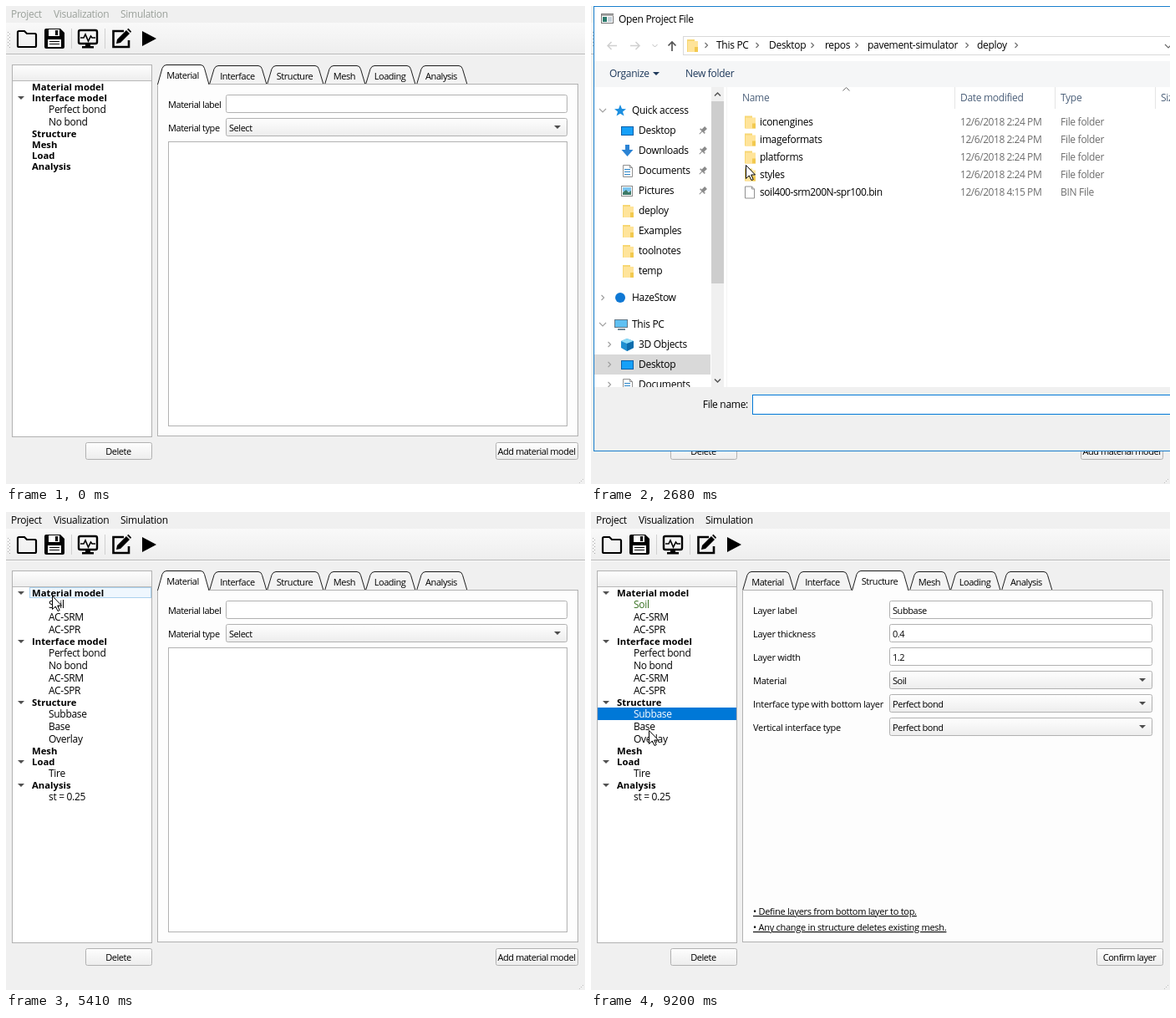
Write an HTML page that moves like this. It is 693 px wide and 572 px high and loops after 9.9 s.

```html
<!DOCTYPE html>
<html lang="en">
<head>
<meta charset="utf-8">
<title>Pavement simulator walkthrough</title>
<style>
html, body { margin: 0; width: 100%; height: 100%; overflow: hidden; background: #f0f0f0; }
svg { display: block; width: 693px; height: 572px; }
text { font: 12px "Open Sans", "Noto Sans", sans-serif; letter-spacing: -.3px; }
.s { font-size: 11px; letter-spacing: -.45px; }
.b { font-size: 11.3px; font-weight: 700; letter-spacing: 0; }
.n { letter-spacing: -.45px; }
.w { font-size: 11px; letter-spacing: -.27px; }
.u { text-decoration: underline; }
.c { text-anchor: middle; }
.e { text-anchor: end; }
</style>
</head>
<body>
<svg id="stage" viewBox="0 0 693 572" xmlns="http://www.w3.org/2000/svg"></svg>
<script>
const LOOP = 9900, EDGE = '#b1b1b1';
let css = '', count = 0;

// ---- drawing helpers
const fill = (x, y, w, h, c) => `<rect x="${x}" y="${y}" width="${w}" height="${h}" fill="${c}"/>`;
const box = (x, y, x2, y2, c = '#fff', edge = EDGE, r = 0) =>
  `<rect x="${x + .5}" y="${y + .5}" width="${x2 - x}" height="${y2 - y}" rx="${r}" fill="${c}" stroke="${edge}"/>`;
const path = (d, c = '#000', edge = 'none', w = 1) =>
  `<path d="${d}" fill="${c}" stroke="${edge}" stroke-width="${w}"/>`;
const line = (d, edge = EDGE, w = 1) => path(d, 'none', edge, w);
const text = (x, y, s, cls = '', c = '#000') => `<text x="${x}" y="${y}" class="${cls}" fill="${c}">${s}</text>`;
const down = (x, y, c = '#4d4d4d', w = 4) => path(`M${x - w} ${y - 2}h${2 * w}l${-w} ${w}z`, c);
const rows = (n, f) => Array.from({ length: n }, (_, i) => f(i)).join('');

// ---- timing helpers: every key holds until the next
const animate = (body, keys) => {
  const id = 'k' + count++;
  css += `@keyframes ${id}{${keys.map(([t, v]) => `${+(t / LOOP * 100).toFixed(4)}%{${v}}`).join('')}}`;
  return `<g style="animation:${id} ${LOOP}ms step-end infinite">${body}</g>`;
};
const layer = (body, keys) => animate(body, Object.entries(keys).map(([t, o]) => [t, `opacity:${o}`]));
const during = (a, b, body) => layer(body, { ...(a ? { 0: 0 } : {}), [a]: 1, ...(b < LOOP ? { [b]: 0 } : {}) });

// ---- form widgets
const label = (x, y, s) => text(x, y + 16, s, 's');
const edit = (x, y, x2, s = '', h = 21) => box(x, y, x2, y + h, '#fff', EDGE, 2) + text(x + 4, y + 16, s, 's');
const combo = (x, y, x2, s) => box(x, y, x2, y + 21, 'url(#soft)', EDGE, 2) +
  text(x + 4, y + 16, s, 's') + down(x2 - 11, y + 11);
const button = (x, x2, s) => box(x, 522, x2, 542, 'url(#soft)', EDGE, 2) + text((x + x2) / 2, 537, s, 's c');

// ---- main window
const toolbar = () =>
  fill(0, 20, 693, 37, 'url(#bar)') + line('M0 57.5H693', '#b8b8b8') + line('M0 58.5H693', '#fafafa') +
  rows(5, i => fill(2, 31 + i * 4, 1, 1, '#a8a8a8') + fill(4, 33 + i * 4, 1, 1, '#a8a8a8')) +
  line('M78.5 27V51M118.5 27V51', '#d0d0d0');

const icons = () =>
  line('M14 31.5Q14 30 15.5 30H22L25 33H34.500Q36 33 36 34.500V47.500Q36 49 34.500 49H15.500Q14 49 14 47.500Z', '#000', 2.2) +
  path('M48 27H65L70 32V49Q70 51 68 51H48Q46 51 46 49V29Q46 27 48 27Z') +
  fill(51, 28, 13, 8, '#fff') + fill(59, 29, 3, 6, '#000') + fill(50, 40, 16, 9, '#fff') +
  line('M52 42.500H64M52 45.500H64', '#000') +
  `<rect x="87" y="29" width="22" height="16" rx="2" fill="none" stroke="#000" stroke-width="2.400"/>` +
  line('M89 38H93L95 34L98.500 42L101.500 36L103 38H107', '#000', 1.6) + fill(95, 45, 6, 4, '#000') + fill(91, 48, 14, 2.5, '#000') +
  line('M141 30H128.500V49H147V41', '#000', 2.6) + path('M132 45L133 40L144 29L148 33L137 44Z') +
  path('M145 28L146.500 26.800L150 30.500L149 32Z') + path('M163 30L180 39L163 48Z');

const menu = c => [[6, 'Project'], [57, 'Visualization'], [137, 'Simulation']].map(([x, s]) => text(x, 14, s, '', c)).join('');

// '*' marks a heading, '+' an open heading
const tree = list => {
  let top = 91;
  return list.split('|').map(item => {
    const head = /^[*+]/.test(item), y = top + 6;
    top += head ? 13 : 15;
    return (item[0] === '+' ? down(18, y, '#505050') : '') +
      (head ? text(31, y + 4, item.slice(1), 'b') : text(51, y + 5, item));
  }).join('');
};
const picked = (top, s) => fill(8, top - 1, 166, 15, '#0078d7') + text(51, top + 11, s, '', '#fff');

const TABS = [[181, 243, 'Material'], [243, 312, 'Interface'], [312, 380, 'Structure'],
  [381, 430, 'Mesh'], [430, 490, 'Loading'], [491, 552, 'Analysis']];
const tab = ([a, b, s], on) => {
  const y = on ? 70.5 : 71.5;
  return path(`M${a + .5} 94L${a + 6} ${y + 4}Q${a + 7.5} ${y} ${a + 11} ${y}H${b - 10}Q${b - 6.5} ${y} ${b - 5.5} ${y + 4}L${b} 94`,
    on ? '#fdfdfd' : '#f3f3f3', '#1c1c1c') + text((a + b) / 2 - .5, on ? 87 : 88, s, 's c');
};
const panel = (active, body) => {
  const [a, b] = TABS[active];
  return TABS.map((t, i) => i === active ? '' : tab(t)).join('') +
    box(181, 93, 684, 514, '#fdfdfd') + tab(TABS[active], true) + fill(a + 1.5, 93, b - a - 2.5, 2, '#fdfdfd') + body;
};

const material = (name, type, extra, btn) => panel(0,
  label(194, 106, 'Material label') + edit(263, 106, 671, name) +
  label(194, 134, 'Material type') + combo(263, 134, 671, type) + box(194, 162, 671, 502) + extra + btn);

const soil = label(206, 174, 'E') + edit(228, 174, 659, '1e+08') + label(206, 202, 'nu') + edit(228, 202, 659, '0.35');

const DATA = [['inf.', '1.76506e+07', '-'], [1, '8.1e+09', '1e-05'], [2, '5.34e+09', '0.001'], [3, '2.09e+09', '0.1'],
  [4, '4.41e+08', '10'], [5, '7.92e+07', '1000'], [6, '1.78e+07', '100000'], [7, '5.28e+06', '1e+07']];
const table = () =>
  box(206, 174, 659, 354) + fill(207, 175, 411, 19, '#efefef') + fill(207, 194, 21, 160, '#efefef') +
  text(325, 189, 'Relaxation modulus (E)', 'w c') + text(520, 189, 'Relaxation time (Tau)', 'w c') +
  DATA.map(([k, e, tau], i) => {
    const y = 194 + i * 20;
    return line(`M207 ${y - .5}H617`, '#c4c4c4') + text(209, y + 15, k, 's') + text(231, y + 14, e, 's') +
      text(426, y + 14, tau, 's', i ? '#000' : '#4f8f38');
  }).join('') +
  line('M227.500 175V354M422.500 175V354M617.500 175V354', '#c4c4c4') +
  fill(645, 175, 14, 179, '#e6e6e6') + box(644, 174, 659, 188, '#fafafa', '#c4c4c4') +
  box(644, 188, 659, 246, '#f6f6f6', '#c4c4c4') + box(644, 340, 659, 354, '#fafafa', '#c4c4c4') +
  path('M648 184h8l-4-4z', '#43204a') + down(652, 347, '#43204a');

const joint = () => panel(1,
  label(194, 106, 'Interface label') + edit(305, 106, 671, 'AC-SRM') +
  label(194, 134, 'interface type') + combo(305, 134, 671, 'Viscoelastic cohesive model') +
  box(194, 162, 671, 422, '#fdfdfd', '#bdbdbd') + table() +
  ['N', 'T'].map((k, i) => {
    const y = 361 + 28 * i;
    return label(205, y, 'Delta_' + k) + edit(249, y, 429, '0.001') + label(435, y, 'Sigma_' + k) + edit(482, y, 659, '0');
  }).join('') +
  label(194, 429, 'Damage evolution law') + combo(305, 429, 671, 'Power function') +
  box(194, 457, 671, 502, '#fdfdfd', '#bdbdbd') +
  label(206, 469, 'C') + edit(219, 469, 353, '1.29') + label(358, 469, 'N') + edit(371, 469, 505, '0.5') +
  label(511, 469, 'M') + edit(525, 469, 659, '0.5') + button(563, 684, 'Confirm interface model'));

const LAYER = [['Layer label', 'Subbase'], ['Layer thickness', '0.4'], ['Layer width', '1.2'], ['Material', 'Soil'],
  ['Interface type with bottom layer', 'Perfect bond'], ['Vertical interface type', 'Perfect bond']];
const structure = () => panel(2,
  LAYER.map(([k, v], i) => {
    const y = 106 + 28 * i;
    return text(194, y + 16, k, 'w') + (i < 3 ? edit : combo)(357, y, 671, v);
  }).join('') +
  text(194, 482, '• Define layers from bottom layer to top.', 'w u') +
  text(194, 501, '• Any change in structure deletes existing mesh.', 'w u') + button(605, 684, 'Confirm layer'));

// ---- file dialog
const folder = (x, y) => fill(x, y, 9, 15, '#f7d774') + fill(x + 1, y + 2, 12, 13, '#ffe49a') + fill(x + 9, y + 9, 4, 6, '#f2c94f');
const page = (x, y) => path(`M${x + .5} ${y + .5}h8l3 3v11h-11z`, '#fff', '#909090') + line(`M${x + 8.5} ${y + .5}v3h3`, '#909090');
const screen = (x, y) => box(x, y, x + 14, y + 10, '#16a0f8', '#0b5fa8');
const sheet = (x, y) => page(x, y) + line(`M${x + 2} ${y + 5.5}h7m-7 3h7m-7 3h7`, '#2d87c9');
const art = {
  star: (x, y) => path(`M${x + 7} ${y}l2 5 5 .3-4 3.300 1.500 5-4.500-2.800-4.500 2.800 1.500-5-4-3.300 5-.3z`, '#1c8fe0'),
  screen: (x, y) => screen(x, y + 2), sheet, folder,
  arrow: (x, y) => path(`M${x + 5} ${y}h5v6h4.500l-7 8-7-8h4.500z`, '#2b83d4'),
  photo: (x, y) => box(x, y + 1, x + 13, y + 13, '#fff', '#8a8a8a') + fill(x + 2, y + 3, 10, 5, '#7cc6f2') +
    path(`M${x + 2} ${y + 12}v-3l4-3 3 3 3-2v5z`, '#3d7a68'),
  dot: (x, y) => `<circle cx="${x + 7}" cy="${y + 7}" r="6" fill="#0f78d4"/>`,
  pc: (x, y) => box(x, y + 1, x + 15, y + 10, '#5fc0f2', '#5f7788') + fill(x + 4, y + 12, 9, 2, '#6f8898'),
  cube: (x, y) => path(`M${x} ${y + 3}l7-3 8 3v8l-8 4-7-4z`, '#1f8fd0') + path(`M${x} ${y + 3}l7-3 8 3-8 3z`, '#8ddcf7') +
    path(`M${x + 7} ${y + 6}l8-3v8l-8 4z`, '#0d6dad')
};
const pin = y => `<g transform="translate(134 ${y}) rotate(45)">` + fill(-2, -5, 4, 6, '#8a8a8a') +
  fill(-4, 0, 8, 1.5, '#8a8a8a') + fill(-.5, 1, 1, 5, '#8a8a8a') + '</g>';

const SIDE = [['star', 'Quick access', 125], ['screen', 'Desktop', 149, 1], ['arrow', 'Downloads', 173, 1],
  ['sheet', 'Documents', 197, 1], ['photo', 'Pictures', 221, 1], ['folder', 'deploy', 245], ['folder', 'Examples', 269],
  ['folder', 'toolnotes', 293], ['folder', 'temp', 317], ['dot', 'HazeStow', 349], ['pc', 'This PC', 381],
  ['cube', '3D Objects', 405], ['screen', 'Desktop', 429], ['sheet', 'Documents', 453]];
const TOP = ['Quick access', 'HazeStow', 'This PC'];
const sidebar = () => fill(4, 417, 139, 24, '#d9d9d9') + SIDE.map(([icon, s, y, pinned]) => {
  const x = TOP.includes(s) ? 49 : 57;
  return art[icon](x - (icon === 'folder' || icon === 'sheet' ? 19 : 21), y - 7) + text(x, y + 4, s) + (pinned ? pin(y) : '');
}).join('') +
  fill(144, 97, 15, 360, '#f0f0f0') + fill(144, 114, 15, 218, '#cdcdcd') +
  line('M148 107.500l3.500-3.500 3.500 3.500M148 446.500l3.500 3.500 3.500-3.500', '#555', 1.5) + line('M162.500 97V457', '#f4f4f4');

const chev = (x, y, c = '#707070') => line(`M${x - 1.5} ${y - 3}l3 3-3 3`, c, 1.2);
const vee = (x, y, c = '#a0a0a0') => line(`M${x - 4} ${y - 2}l4 4 4-4`, c, 1.1);
const PATH = [[150, 'This PC', 138], [213, 'Desktop', 199], [280, 'repos', 265], [331, 'pavement-simulator', 318], [462, 'deploy', 450]];
const FILE = 'soil400-srm200N-spr100.bin', STAMP = '12/6/2018 4:15 PM';

const fileRow = (s, i) => {
  const y = 139 + 21 * i, bin = i === 4;
  return (bin ? page : folder)(184, y - 7.5) + text(202, y + 4, s, bin ? 'n' : '') +
    text(442, y + 4, bin ? STAMP : '12/6/2018 2:24 PM', 'n', '#6d6d6d') +
    text(562, y + 4, bin ? 'BIN File' : 'File folder', '', '#6d6d6d');
};
const tip = () => fill(195, 239, 191, 50, '#d8d8d8') + box(192, 236, 382, 285, '#fff', '#c8c8c8') +
  ['Type: BIN File', 'Size: 2.96 KB', 'Date modified: ' + STAMP].map((s, i) => text(198, 250 + 15 * i, s, 'n', '#bcbcbc')).join('');

const dialog = () =>
  fill(3, 0, 690, 533, '#1a7fcd') + fill(4, 1, 689, 531, '#fff') +
  box(12, 9, 26, 20, '#fff', '#777') + fill(13, 10, 14, 2, '#aaa') + fill(14, 13, 5, 6, '#2b7a6c') + fill(20, 13, 5, 6, '#c4d0d8') +
  text(33, 20, 'Open Project File') +
  line('M31 47.500H20M24.500 43L20 47.500L24.500 52M47 47.500H58M53.500 43L58 47.500L53.500 52', '#d0d0d0', 1.5) +
  line('M73.500 46l3 3 3-3', '#bdbdbd') + line('M97 54V43M92.500 47.500L97 43L101.500 47.500', '#555', 1.7) +
  box(110, 36, 700, 58, '#fff', '#d9d9d9') + folder(115, 40) +
  PATH.map(([x, s, cx]) => chev(cx, 47) + text(x, 51, s)).join('') + vee(691, 48, '#666') +
  fill(4, 66, 689, 31, '#f5f6f7') + text(22, 85, 'Organize', '', '#1e395b') + down(78, 81, '#1e395b') + text(113, 85, 'New folder', '', '#1e395b') +
  text(181, 114, 'Name', '', '#4c607a') + text(442, 114, 'Date modified', '', '#4c607a') + text(562, 114, 'Type', '', '#4c607a') +
  text(682, 114, 'Size', '', '#4c607a') + line('M301.500 101.500l4-4 4 4', '#707070') +
  line('M435.500 97V123M555.500 97V123M675.500 97V123', '#e5e5e5') + sidebar() +
  during(2130, LOOP, vee(14, 125) + vee(14, 381) + chev(14, 349, '#a0a0a0') +
    [405, 429, 453].map(y => chev(22, y, '#a0a0a0')).join('') + chev(509, 47)) +
  during(2820, 3210, fill(178, 213, 515, 21, '#e5f3ff')) + during(3210, LOOP, fill(178, 213, 515, 21, '#cce8ff')) +
  ['iconengines', 'imageformats', 'platforms', 'styles', FILE].map(fileRow).join('') +
  fill(4, 456, 689, 76, '#f0f0f0') + text(188, 481, 'File name:', 'e') + box(193, 465, 700, 488, '#fff', '#0078d7') +
  layer(fill(197, 470, 1, 15, '#000'), { 0: 1, 2350: 0, 2880: 1, 3210: 0 }) +
  during(3210, LOOP, text(197, 481, FILE, 'n')) +
  layer(tip(), { 0: 0, 3070: .4, 3150: 1, 3210: 0 });

// ---- pointer: [start, end, steps, x, y]
const MOVES = [[170, 170, 1, 428, 520], [248, 1110, 12, 21, 40], [2050, 2980, 13, 233, 234], [4550, 5250, 10, 57, 94],
  [5410, 5410, 1, 55, 100], [5490, 5720, 4, 58, 113], [6030, 6680, 9, 75, 200], [8020, 8020, 1, 63, 230],
  [8170, 8170, 1, 75, 235], [8410, 8410, 1, 75, 242], [8490, 8490, 1, 75, 245], [8640, 9200, 8, 69, 261]];
const pointer = () => {
  const at = (x, y) => `transform:translate(${x.toFixed(0)}px,${y.toFixed(0)}px)`;
  const keys = [[0, at(-40, -40)]];
  let px = 0, py = 0;
  for (const [a, b, n, x, y] of MOVES) {
    for (let k = 1; k <= n; k++) {
      const u = k / n, ease = u * u * (3 - 2 * u);
      keys.push([a + (b - a) * (k - 1) / (n - 1 || 1), at(px + (x - px) * ease, py + (y - py) * ease)]);
    }
    [px, py] = [x, y];
  }
  return animate(path('M.5 .5V16.500L4.300 13L7 18.500L9.200 17.600L6.700 12H11.500Z', '#fff', '#000'), keys);
};

const grad = (id, a, b) => `<linearGradient id="${id}" x2="0" y2="1"><stop stop-color="${a}"/><stop offset="1" stop-color="${b}"/></linearGradient>`;
const art0 = '<defs>' + grad('soft', '#fefefe', '#ededed') + grad('bar', '#f9f9f9', '#eeeeee') + '</defs>' +
  fill(0, 0, 693, 572, '#f0f0f0') + toolbar() +
  during(0, 1180, menu('#9aa09a')) + during(1180, LOOP, menu('#000')) +
  layer(box(9, 24, 40, 54, '#fcfcfc', '#b8b8b8', 2), { 0: 0, 1030: 1, 1820: 0 }) +
  during(1410, 1820, box(9, 24, 40, 54, '#dedede', '#a8a8a8', 2)) + icons() +
  box(7, 70, 174, 515) + fill(8, 71, 166, 18, 'url(#soft)') + line('M8 89.500H174', '#b8b8b8') + button(95, 174, 'Delete') +
  during(1180, 5950, box(28, 90, 173, 102, '#eff7fe', '#a9d0ee')) +
  during(0, 3600, tree('*Material model|+Interface model|Perfect bond|No bond|*Structure|*Mesh|*Load|*Analysis')) +
  during(3600, LOOP, tree('+Material model|Soil|AC-SRM|AC-SPR|+Interface model|Perfect bond|No bond|AC-SRM|AC-SPR|' +
    '+Structure|Subbase|Base|Overlay|*Mesh|+Load|Tire|+Analysis|st = 0.25')) +
  during(5950, 6850, picked(104, 'Soil')) +
  during(6850, LOOP, fill(50, 104, 30, 14, '#fff') + text(51, 115, 'Soil', '', '#35701f')) +
  during(6850, 8020, picked(192, 'AC-SRM')) + during(8020, LOOP, picked(235, 'Subbase')) +
  during(0, 5950, material('', 'Select', '', button(586, 684, 'Add material model'))) +
  during(5950, 6930, material('Soil', 'Linear elastic', soil, button(565, 684, 'Confirm material model'))) +
  during(6930, 8020, joint()) + during(8020, LOOP, structure()) +
  rows(3, i => fill(690 - 2 * i, 566 + 2 * i, 1, 1, '#bdbdbd')) +
  layer(dialog(), { 0: 0, 1580: .35, 1660: .75, 1740: 1, 3456: .85, 3532: .6, 3608: .35, 3684: .15, 3760: 0 }) +
  pointer();

document.getElementById('stage').innerHTML = `<style>${css}</style>` + art0;
</script>
</body>
</html>
```
